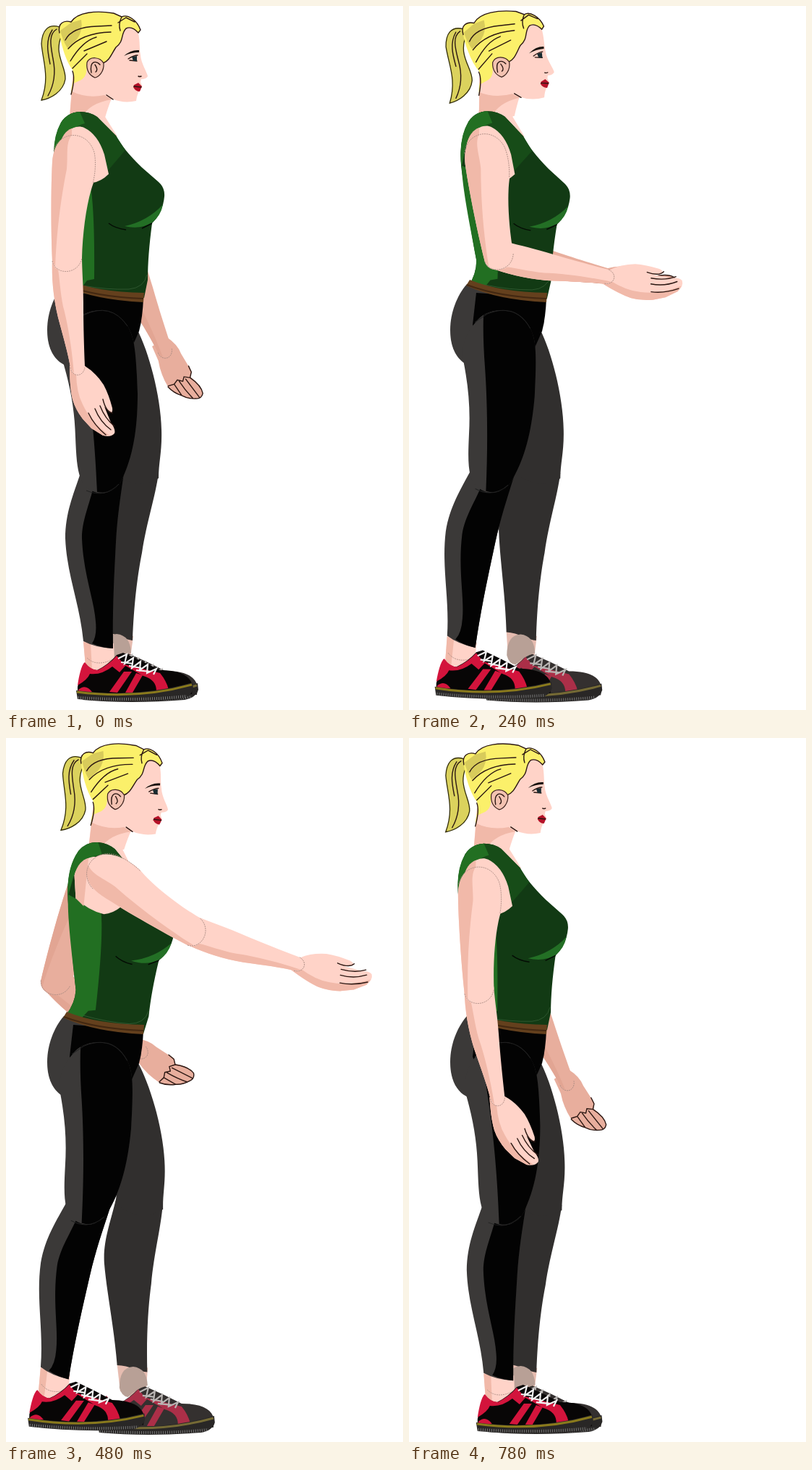
Write an HTML page that moves like this. It is 549 by 972 pixels and loops after 0.8 s.

```html
<!DOCTYPE html>
<html lang="en">
<head>
<meta charset="utf-8">
<title>Arm swing</title>
<style>
html, body { margin: 0; height: 100%; overflow: hidden; background: #fff; }
svg { display: block; width: 100vw; height: 100vh; }
.near { --skin: #ffd3c8; --shade: #f1b9a9; --red: #d3143c; --dark: #080606; --lace: #f2f2f2; --sole: #8a7a1c; }
.far { --skin: #e8ae9d; --shade: #e2a593; --red: #ab2f48; --dark: #34302f; --lace: #b9b5b3; --sole: #756a35; }
.skin { fill: var(--skin); }
.shade { fill: var(--shade); }
.red { fill: var(--red); }
.dark { fill: var(--dark); }
.line { fill: none; stroke: #2b1712; stroke-width: 1.4; stroke-linecap: round; }
.seam { fill: none; stroke: #a88a82; stroke-width: .8; stroke-dasharray: 2 1; }
.gray { fill: #3b3938; }
.black { fill: #030303; }
</style>
</head>
<body>
<svg viewBox="0 0 549 972" preserveAspectRatio="none">
<defs>
  <g id="upper">
    <path class="skin" d="M94 178C76 179 66 192 64 215C62 250 62 310 64 352C65 363 75 367 84 367C96 367 104 360 105 348C106 310 112 268 121 244C126 222 125 180 94 178Z"/>
    <path class="shade" d="M91 178C76 180 66 192 64 215C62 250 62 310 64 352L68 360C70 310 76 265 84 225C86 205 82 190 91 178Z"/>
    <path class="seam" d="M66 200C74 172 112 170 122 202C125 216 123 234 120 245M64 352C68 372 100 372 105 348"/>
  </g>
  <g id="fore">
    <path class="skin" d="M64 345C63 375 65 400 72 430C80 460 86 480 89 499C91 513 107 513 109 499C108 470 107 445 107 410C107 385 105 365 105 345Z"/>
    <path class="shade" d="M64 350C63 375 65 400 72 430C80 460 86 480 89 499L94 508C92 480 86 440 79 415C75 395 74 375 72 364Z"/>
    <path class="seam" d="M89 499C91 513 107 513 109 499"/>
  </g>
  <g id="shoe">
    <path class="dark" d="M99 940L108 907Q118 917 126 917Q142 909 153 896L162 893Q188 904 213 917C240 917 255 924 258 939L257 950H99Z"/>
    <path class="red" d="M99 938C101 925 104 910 109 906Q117 917 127 917Q143 909 153 897L165 911L157 920L147 912Q132 924 116 922Q113 930 99 938ZM100 944Q110 935 119 947L100 948ZM143 947L163 919L174 919L154 948ZM165 948L180 921L189 924L175 948ZM160 908L213 921Q222 932 225 944L208 946Q208 930 190 925Z"/>
    <path d="M97 945Q182 956 258 934L259 943Q256 954 240 957Q165 963 99 957Z" fill="#292726"/>
    <path d="M98 947Q182 958 257 937" fill="none" stroke="var(--sole)" stroke-width="3"/>
    <path d="M100 955Q180 960 250 953" fill="none" stroke="#777" stroke-width="4" stroke-dasharray="1 2"/>
    <path d="M155 901L167 895L164 908L176 900L174 914L186 905L185 917L196 909L195 921L208 915L204 923M159 906L176 908M170 911L187 914M180 917L199 919" fill="none" stroke="var(--lace)" stroke-width="2.2"/>
  </g>
</defs>

<!-- Far leg -->
<g class="far" data-joint="farThigh">
  <g data-joint="farShin">
    <path d="M134 862L136 900Q158 918 172 900L176 870Z" fill="#e6bcb0"/>
    <path d="M148 630C138 665 125 690 125 722C126 765 133 810 134 864Q146 865 158 871Q168 875 175 876C177 820 183 780 188 755C195 710 206 680 211 645Z" fill="#312f2e"/>
    <g data-joint="farFoot">
      <use href="#shoe" x="7" y="1"/>
      <path d="M134 896Q134 868 153 867Q172 869 173 893Q158 897 146 909Q137 908 134 896Z" fill="#b8a096"/>
    </g>
  </g>
  <path d="M130 440L181 446C198 478 214 540 215 585C216 615 211 630 211 652Q180 670 148 645Z" fill="#312f2e"/>
</g>

<!-- Far arm -->
<g class="far" data-joint="torso"><g transform="translate(8 -1)"><g data-joint="farUpper">
  <g data-joint="farFore">
    <g data-joint="farHand"><g transform="translate(98 498) rotate(69)">
      <path class="skin" d="M-12 -14Q5 -20 18 -16L46 -13L52 -7Q70 -12 80 -7Q85 -1 80 5Q74 14 65 18Q55 25 44 26Q24 24 7 15L-14 10Z"/>
      <path class="line" d="M38 -14L47 -12L52 -6Q70 -12 80 -7Q85 -1 80 5Q74 14 65 18Q55 25 44 26M52 -6L46 0L50 5L44 10L46 17L43 25M50 0H81M47 9Q63 10 77 8M46 17L65 18"/>
    </g></g>
    <use href="#fore"/>
  </g>
  <use href="#upper"/>
</g></g></g>

<!-- Hips and near leg -->
<path class="gray" d="M80 384C66 400 57 424 57 447C57 475 68 490 82 496L150 480L186 440L190 398Z"/>
<path class="black" d="M93 396L190 403Q189 430 184 449L172 476L110 490Q96 462 88 440Z"/>
<g class="near" data-joint="thigh">
  <g data-joint="shin">
    <path class="skin" d="M107 875L110 912Q127 926 150 902L149 880Z"/>
    <path class="shade" d="M107 878L110 912L119 916L117 880Z"/>
    <path class="seam" d="M112 900Q125 913 148 902"/>
    <g data-joint="foot"><use href="#shoe"/></g>
    <path class="gray" d="M103 645C93 675 82 700 82 735C84 785 102 825 107 877Q124 886 148 887C147 830 150 780 152 740C154 705 158 680 163 645Z"/>
    <path class="black" d="M122 660C115 690 105 710 105 735C107 785 122 820 124 850Q126 870 119 880Q132 886 148 887C147 830 150 780 152 740C154 705 158 680 163 645Z"/>
  </g>
  <path class="gray" d="M92 440C80 455 75 475 79 492C90 530 95 560 96 595C97 620 98 638 103 652C108 667 125 675 138 672Q155 668 162 650C178 615 182 575 182 535C181 510 180 480 176 462C165 410 108 412 92 440Z"/>
  <path class="black" d="M102 429C103 450 106 475 110 500C117 545 123 600 126 671Q152 676 162 650C178 615 182 575 182 535C181 510 180 480 176 462C167 420 130 412 102 429Z"/>
  <path d="M91 440L107 427Q145 408 168 442M111 669Q137 680 156 660" fill="none" stroke="#222" stroke-width="1"/>
</g>

<!-- Head and shirt -->
<g class="near" data-joint="torso">
  <path class="skin" d="M92 135L138 133L137 153L154 180L120 190L88 155Z"/>
  <g data-joint="head">
    <path class="skin" d="M92 98L118 60L162 28L181 31C186 45 184 56 186 68C187 80 195 91 196 97Q194 101 187 101L186 105L188 110L184 118Q181 123 180 131Q163 135 146 128Q142 137 137 154L88 153Z"/>
    <path class="shade" d="M91 118Q112 128 136 123L146 129Q116 134 105 153L88 153Z"/>
    <path d="M74 29C58 24 50 34 49 52C51 77 61 98 49 130C61 128 79 119 82 101C83 88 74 77 73 60C73 46 77 38 85 36Z" fill="#dbd25d" stroke="#322d08" stroke-width="1.3"/>
    <path class="line" d="M70 32C58 39 62 56 65 73Q71 101 58 124M64 33C54 48 58 65 61 80"/>
    <path d="M74 36C71 24 80 19 90 22C99 8 125 6 149 10L160 15C168 11 181 19 186 33L183 37C176 30 171 27 166 31C158 39 164 48 152 57C146 66 143 76 134 79C130 70 118 70 112 77C111 89 113 96 104 102L93 107L91 122C88 109 97 101 92 88C82 75 75 49 74 36Z" fill="#fbf06a"/>
    <path d="M75 34L90 23L104 19Q107 34 98 46L85 58Q78 47 75 34Z" fill="#d8cb5b"/>
    <path class="line" d="M74 37C71 24 80 19 90 22C99 8 125 6 149 10L160 15C168 11 181 19 186 33L183 37Q174 27 166 31M160 15Q155 25 158 34M166 31C158 39 164 48 152 57C146 66 143 76 134 79M92 90Q96 100 90 122M82 47Q91 29 126 28L146 27M86 59Q105 37 145 36M89 76Q106 48 125 43M92 86L112 66M108 62L139 49M155 23L166 16L178 22"/>
    <path d="M112 78C116 69 130 70 135 79C136 91 128 98 123 99C114 95 111 87 112 78Z" fill="#f3c2b1" stroke="#3b211c" stroke-width="1.2"/>
    <path class="line" d="M118 92C115 75 125 75 130 81M124 91Q128 88 123 81M139 123L148 129"/>
    <path d="M163 69Q173 60 184 61L184 64Q173 64 163 69Z" fill="#17110d"/>
    <path class="line" d="M169 73Q177 68 182 68M171 75L181 76M183 97Q185 98 187 97"/>
    <path d="M174 70L181 69L181 76L176 76Z" fill="#182b30"/>
    <path d="M177 109L183 106L188 111L185 118Q179 118 176 112Z" fill="#b51229"/>
    <path class="line" d="M177 111L187 112"/>
  </g>
  <path d="M76 161Q85 147 102 146Q116 146 126 153L152 179Q162 198 188 223L211 243Q220 251 219 263Q217 285 202 300C198 330 196 355 196 378L191 403L82 388Q93 370 92 352C82 305 76 270 70 238C64 210 65 182 76 161Z" fill="#123a14"/>
  <path d="M76 161Q85 147 102 146Q116 146 126 153L152 179L165 199L142 226L121 242L120 190L92 170L74 190Z" fill="#174c18"/>
  <path d="M76 161Q85 147 102 146L109 162Q90 166 73 196L68 225Q62 185 76 161ZM68 222L116 242Q123 280 122 377L112 379L103 391L82 388Q93 370 92 352C82 305 70 255 68 222Z" fill="#226f22"/>
  <path class="skin" d="M74 195C77 174 96 162 108 168Q127 177 136 205L142 232Q132 242 120 244Q98 241 79 226Z"/>
  <path class="shade" d="M74 195C76 180 83 172 91 169L91 236L79 226Z"/>
  <path d="M164 304Q196 297 217 274Q214 290 202 299Q186 309 164 304Z" fill="#236f25"/>
  <path d="M142 300Q151 307 166 309M188 307L202 300" fill="none" stroke="#040c04" stroke-width="1.5"/>
  <path d="M106 386Q140 392 170 391Q191 389 195 371" fill="none" stroke="#355e35" stroke-width=".8"/>
</g>
<path d="M84 378Q125 395 191 396L190 409Q123 406 79 386Z" fill="#64401d"/>
<path d="M80 385Q126 402 190 404" fill="none" stroke="#432812" stroke-width="2"/>

<!-- Near arm -->
<g class="near" data-joint="torso"><g data-joint="upper">
  <g data-joint="fore">
    <g data-joint="hand">
      <path class="skin" d="M88 497Q88 527 92 543Q96 557 106 570L118 583L134 593Q145 596 150 590Q152 585 145 575L136 553L143 561Q148 563 147 555Q142 536 135 523Q124 506 109 497Z"/>
      <path class="shade" d="M88 497Q88 527 92 543Q96 557 106 570L118 583L134 593L143 593Q117 574 106 550Q97 533 97 505Z"/>
      <path class="line" d="M134 543Q138 560 147 562M123 556Q130 574 145 585M114 562Q122 579 138 592M130 552Q137 570 150 580"/>
    </g>
    <use href="#fore"/>
  </g>
  <use href="#upper"/>
</g></g>
</svg>
<script>
const LOOP = 800, STEP = 20, TIMES = [0, 200, 360, LOOP];

// Pivot x, y, then the angle relative to the parent at the first three key times.
const JOINTS = {
  torso: [135, 395, 0, -.6, 8],
  head: [115, 130, 0, -5.4, -5.5],
  upper: [92, 178, 0, 12.9, -90.5],
  fore: [84, 347, 0, -79.3, -9.5],
  hand: [98, 498, 0, 14, 19],
  farUpper: [92, 178, -24.7, -28.1, 22.8],
  farFore: [84, 347, 8.7, -48.3, -86],
  farHand: [98, 498, 0, 7, 3],
  thigh: [130, 440, 0, 4.06, 7.3],
  shin: [130, 645, 0, 3.61, 6.5],
  foot: [128, 915, 0, -6.4, -11.5],
  farThigh: [170, 440, 0, 1.4, -2.3],
  farShin: [180, 645, 0, -.6, -2.6],
  farFoot: [150, 915, 0, -.8, 4.9]
};
const parts = [...document.querySelectorAll('[data-joint]')];

function draw(now) {
  const t = Math.floor(now % LOOP / STEP) * STEP;
  const i = t < TIMES[1] ? 0 : t < TIMES[2] ? 1 : 2;
  const mix = (t - TIMES[i]) / (TIMES[i + 1] - TIMES[i]);
  for (const part of parts) {
    const [x, y, ...angles] = JOINTS[part.dataset.joint];
    const from = angles[i], to = angles[(i + 1) % 3];
    part.setAttribute('transform', `rotate(${from + (to - from) * mix} ${x} ${y})`);
  }
}

const start = performance.now();
function tick() {
  draw(performance.now() - start);
  requestAnimationFrame(tick);
}
tick();
</script>
</body>
</html>
```
